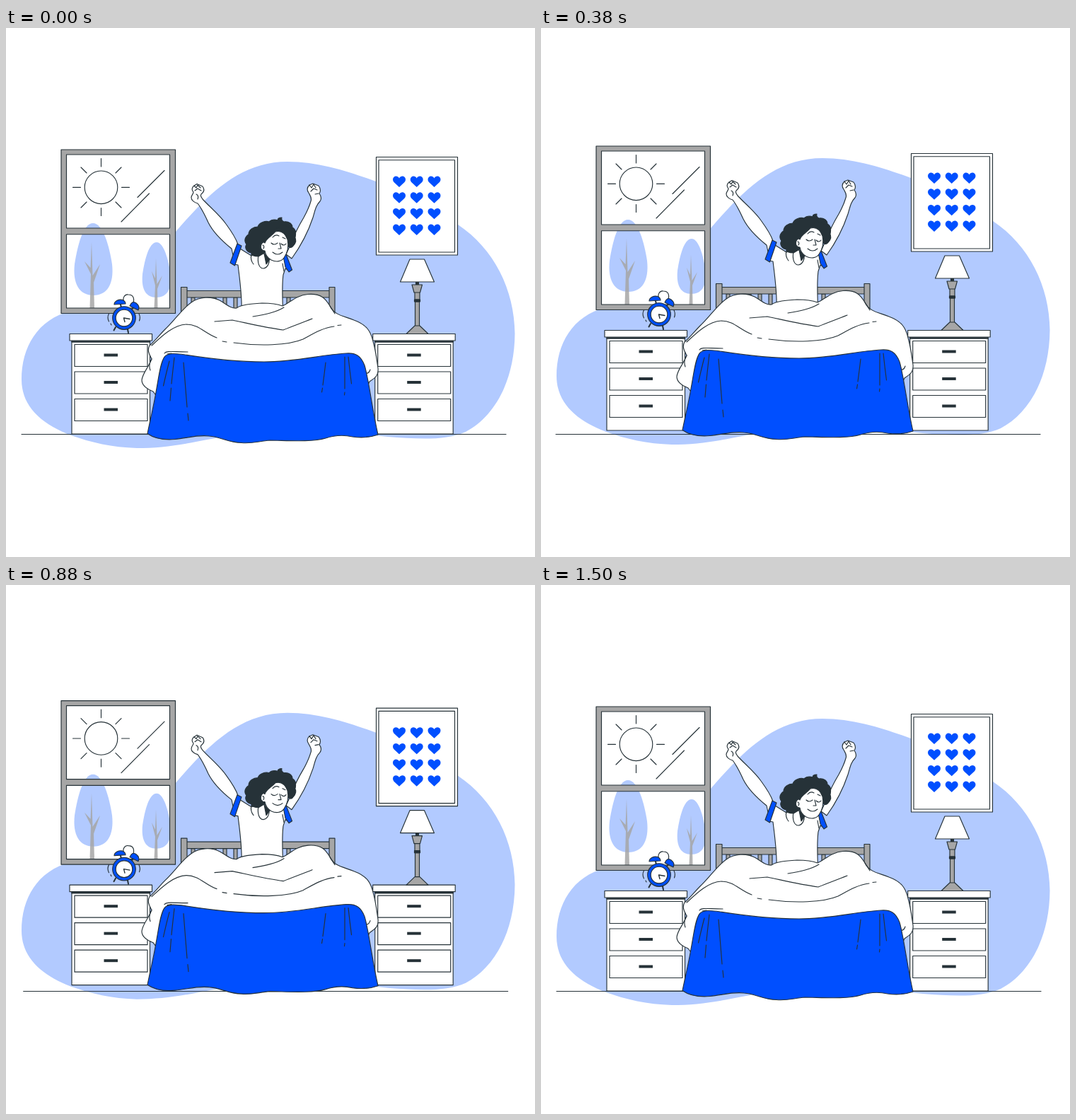
Write an HTML page that moves like this. It is 748x748 px and loops after 1540 ms.

```html
<!DOCTYPE html>
<html lang="en">
<head>
<meta charset="utf-8">
<title>Good morning</title>
<style>
html, body { margin: 0; width: 100%; height: 100%; overflow: hidden; background: #fff; }
svg { display: block; width: 100%; height: 100%; stroke: #263238; stroke-width: 1.15; stroke-linecap: round; stroke-linejoin: round; fill: none; }
.w { fill: #fff; }
.g { fill: #a6a6a6; }
.b { fill: #004fff; }
.d { fill: #263238; }
.s { fill: #b2caff; }
.n { stroke: none; }
</style>
</head>
<body>
<svg viewBox="0 0 748 748">
  <defs>
    <path id="heart" class="b n" d="M0 8L-7.500 1C-9.500 -1-9.500 -4.500-7.500 -6.300C-5.300 -8.200-1.800 -7.700 0 -4.600C1.800 -7.700 5.300 -8.200 7.500 -6.300C9.500 -4.500 9.500 -1 7.500 1Z"/>
    <g id="stand">
      <path class="w" d="M93 442H203.500V574H93Z"/>
      <path stroke-width="2.500" d="M93.500 443.500H203"/>
      <path class="w" d="M90 432.500H206.500V442H90Z"/>
      <g id="drawers"></g>
    </g>
  </defs>

  <g class="float">
    <path class="s n" d="M22 497C22 452 44 412 92 400C150 386 210 330 240 288C285 236 330 189 398 189C445 189 490 205 523 217C580 236 620 262 639 278C690 312 719 370 719.500 432C719 500 690 550 650 571C622 584 580 581 540 578C450 568 380 566 290 581C250 589 220 594 185 594C150 593 120 586 92 576C50 560 22 535 22 497Z"/>
  </g>

  <path id="floor" d="M22 574.500H707"/>

  <g class="float">
    <!-- window -->
    <path class="w n" d="M79 173H239V402H79Z"/>
    <path class="s n" d="M123 276C137 276 146 308 150 334C153 362 143 378 123.500 378C104 378 94 362 97 334C101 308 109 276 123 276Z"/>
    <path class="s n" d="M213 303C223 303 230 328 232.500 348C235 370 227 381 212.500 381C198 381 191 370 193 348C196 328 202 303 213 303Z"/>
    <path class="g n" fill-opacity=".85" d="M121 303L122.500 350L133 334L124 360L125 396H118.500L120 348L111 330L119.500 339Z"/>
    <path class="g n" fill-opacity=".85" d="M212 326L213.500 362L221 350L214 369L214.500 396H209.500L211 364L206 344L211 354Z"/>
    <path class="g" fill-rule="evenodd" d="M78 172H239.500V403.500H78ZM85.500 179V283H231.500V179ZM85.500 291.700V396H231.500V291.700Z"/>
    <circle cx="134.500" cy="225.300" r="23.300"/>
    <path d="M134.500 184.500V196M134.500 254.500V265.500M94.500 225.300H105.500M163.500 225.300H174.500M106 197L114 205M163 197L155 205M106 254L114 246M163 254L155 246M224 201.500L186 239.500M202.500 234L163 274"/>

    <!-- picture -->
    <path class="w" d="M523.500 182.500H638.500V321H523.500Z"/>
    <path d="M527 186.700H634.500V317H527Z"/>
    <g id="hearts"></g>

    <!-- nightstands -->
    <use href="#stand"/>
    <use href="#stand" x="428.700"/>

    <!-- lamp -->
    <path class="d" d="M579.500 359H583.500V364H579.500Z"/>
    <path class="w" d="M571 327H591.500L605.500 359H557.500Z"/>
    <path class="g" d="M578.500 387H584.500V421H578.500ZM566 432.500L578 421H585L597 432.500ZM578 374H585V384H578ZM574 363H588.500L585.500 374H577Z"/>
    <path class="d" d="M577.500 384H585.500V387H577.500Z"/>

    <!-- alarm clock -->
    <path class="w" d="M167 387C164 382 168 376 173 377C179 377 182 381 180 389"/>
    <path stroke-width="2" d="M155 423L152.500 427.500M172 426L173 431M162 391L163 395M180 395L177 399"/>
    <path class="b" d="M153 391C153 386 160 383 165 384.500C168 386 169 388 169 390ZM175 393C177 388 180 386 184 389C188 392 189 395 187 399Z"/>
    <circle class="b" cx="167" cy="410" r="16.300"/>
    <circle class="w" cx="167" cy="410" r="11.800"/>
    <path stroke-width="1.400" d="M175 411.500L166.500 410L168 415.500"/>
    <path d="M145.500 404Q142.500 409 145.500 415M148 418L149 420M188 404Q190.500 409 188.500 414"/>

    <!-- headboard -->
    <g id="slats" class="g"></g>
    <path class="g" d="M256 371.500H457V381H256ZM247.500 366.500H256V420H247.500ZM457 366.500H465V420H457Z"/>

    <!-- sleeper -->
    <path class="w" d="M319 312C304 300 292 287 286 275C281 264 275 253 271 248C267 247 262 244 262 240C262 236 265 235 265 232C262 229 263 225 266 223L270 220.500L278 224C281 228 280 232 276 235C274 238 277 240 278 242C288 253 302 264 311 277C319 288 325 297 328 306L322 326Z"/>
    <path d="M266 223L269 226L271 222L275 226M267 230L271 227L276 230M269 235Q273 237 271 242"/>
    <path class="w" d="M403 305C408 291 415 278 421 268C426 259 429 252 431 245C433 240 430 237 428 233C425 229 426 225 429 222L434 220L442 223C445 227 445 231 443 234C446 238 446 242 444 245C438 251 437 258 434 268C428 286 417 308 404 326L396 320Z"/>
    <path d="M429 222L432 226L435 221L438 226M431 231L435 227L440 229M442 234L437 235"/>
    <path class="w" d="M331 312L347 322L360 318L382 322L393 320L400 343L395 340L392 349C390 364 391 378 391.500 400H333C334 380 331 360 328 335L322 334Z"/>
    <path class="b" d="M327 305L333 308L323.500 336L317 332ZM391 317L396 320L404.500 342L400 345L395 338Z"/>
    <path d="M357 321C355 332 358 340 364 340C370 339 373 332 372 326M347 320Q345 328 350 334M391 333L393 344"/>
    <path class="d" d="M365 319L373 327L368 334Z"/>
    <path class="d" d="M357 323C351 323 346 321 347 318C340 317 337 310 340 306C336 301 338 295 343 292C343 285 350 281 356 281C358 275 367 272 372 274C376 270 382 271 385 272C383 270 386 268 390 268C389 271 391 273 393 274C400 273 405 277 405 282C410 285 411 291 408 295C412 301 408 306 406 308C404 312 400 311 396 306L390 300L367 317Z"/>
    <path class="w" d="M366 304C368 297 376 294 381 288C389 286 395 291 398 299C400 308 398 318 393 325C389 331 381 331 375 328C370 325 367 321 366 315C361 315 359 310 361 306C362 303 365 302 366 304Z"/>
    <path d="M375 304Q379 308 384 304M389 305Q393 309 396 305M377 296Q381 291 386 294M391 296L395 298M387 304L389 312L385 312M377 317Q384 323 391 317M363 307Q366 308 364 312"/>
    <path class="d" d="M380 286C391 283 398 290 400 299L404 309C408 307 410 303 407 299C411 295 410 287 404 284L390 278Z"/>

    <!-- bedding -->
    <path class="w" d="M208 514C198 510 192 505 192 498C193 488 201 481 206 468C203 462 199 456 203 449C212 441 216 435 225 426C238 414 249 397 262 388C273 380 290 379 302 385C311 390 318 397 326 396C333 391 346 390 362 389C374 389 383 390 391 393C402 388 410 378 427 376.500C446 375 452 383 458 393C464 406 477 407 492 413C511 420 516 430 519 443C523 457 524 468 526 481C527 491 523 494 514 500L500 530H220Z"/>
    <path d="M206 468Q201 475 204 484M224 460C227 456 235 458 257 458M228 461L234 460M206 449C222 434 237 420 255 419C273 419 281 432 298 438M306 443L312 444M322 445C358 450 399 449 420 440C433 433 447 424 464 422M469 420.500L474 420M295 415L320 413C344 418 369 424 392 427C407 421 418 417 433 411M349 408C367 405 382 402 393 395M458 393L465 404M509 488Q513 489 515 483"/>
    <path class="b" d="M200 573.500C204 554 209 533 212 515C216 494 218 474 224 465C229 459 240 460 253 462C291 468 327 472 365 472C410 472 445 462 481 460C495 459 502 464 507 477C513 497 517 535 526 575C515 579 505 580 490 578C477 575 464 576 452 580C432 586 394 583 373 583C358 584 349 588 333 586.500C313 586 304 578 287 577C270 575 256 580 239 581.500C220 583 209 580 200 573.500Z"/>
    <path d="M231 471Q227 486 222.500 506M238 466C236 484 235 492 234 503M233.500 509L232 527M251 473L256 536M257 545L258 555M452 473Q450 490 448 505M447.500 509L446.500 515M479 465V510M479 515L478.500 519M484 465Q486 484 488.500 503"/>
  </g>
</svg>
<script>
const $ = id => document.getElementById(id);
const repeat = (list, draw) => list.map(draw).join('');

$('hearts').innerHTML = repeat([217, 239.7, 262.3, 285], y =>
  repeat([556, 580.7, 605.5], x => `<use href="#heart" x="${x}" y="${y}"/>`));

$('drawers').innerHTML = repeat([0, 38.5, 77], y =>
  `<path class="w" d="M97 ${447.5 + y}h103v31h-103z"/>
   <path class="d n" d="M138.500 ${460.5 + y}h19.500v4h-19.500z"/>`);

$('slats').innerHTML = repeat([...Array(13).keys()], i =>
  `<path d="M${262 + i * 15} 381h5v30h-5z"/>`);

const LOOP = 1540, FPS = 24, CYCLE = 1.5;
const shake = [0, -1, 2, -4, 4, -4, 4, -4, 2, -1, 0];
const floats = document.querySelectorAll('.float');
const floor = $('floor');
const start = performance.now();

function shakeAt(p) {
  const i = Math.min(Math.floor(p * 10), 9);
  return shake[i] + (shake[i + 1] - shake[i]) * (p * 10 - i);
}

const move = (el, x, y) => el.setAttribute('transform', `translate(${x} ${y})`);

function draw() {
  // Steps at 24 per second, each starting on a 10 ms tick
  const time = (performance.now() - start) % LOOP;
  const step = Math.floor((time + 4) * FPS / 1000);
  const p = Math.min(step / FPS / CYCLE, 1);
  const lift = -10 * (1 - Math.abs(1 - 2 * p));
  floats.forEach(g => move(g, 0, lift));
  move(floor, shakeAt(p), 0);
  requestAnimationFrame(draw);
}

draw();
</script>
</body>
</html>
```
